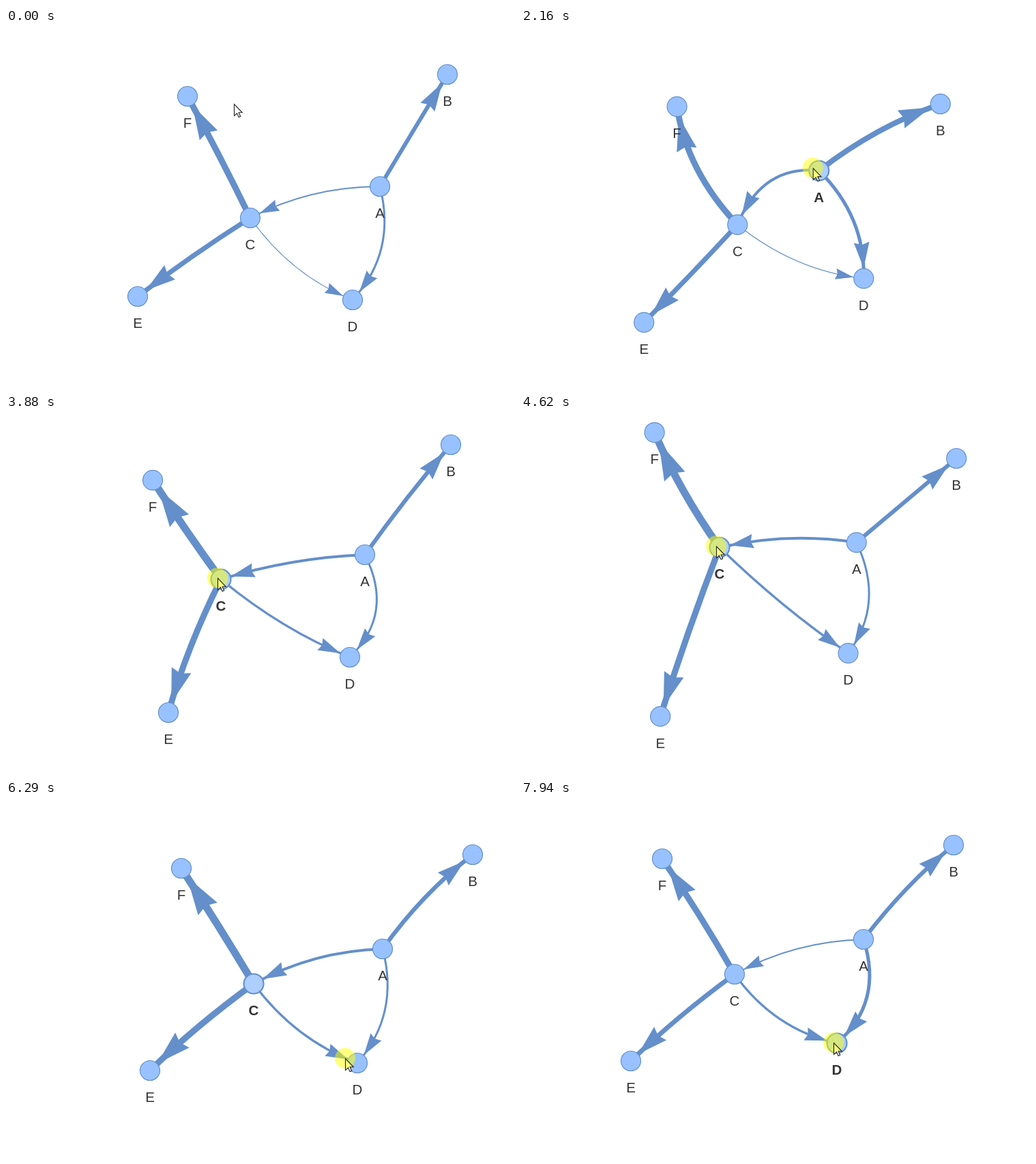
Write an HTML page with a canvas that moves like this. It is 746x524 px and loops after 8000 ms.

```html
<!DOCTYPE html>
<html lang="en">
<head>
<meta charset="utf-8">
<title>Draggable network</title>
<style>
  html, body { margin: 0; width: 100%; height: 100%; overflow: hidden; background: #fff; }
  canvas { display: block; }
</style>
</head>
<body>
<canvas id="stage" width="746" height="524"></canvas>
<script>
const LOOP = 8000;
const STEP = 1000 / 60;
const RADIUS = 15;
const EDGE_COLOR = '#648fca';
const ctx = document.getElementById('stage').getContext('2d');

// Key poses of the layout; nodes glide through them on a smooth curve.
const poseTimes = [900, 1590, 2810, 3880, 4600, 5430, 6200];
const paths = {
  A: [[548, 232], [402, 230], [504, 188], [526, 206], [492, 188], [505, 208], [552, 218]],
  B: [[647, 68], [592, 133], [650, 72], [652, 45], [638, 64], [662, 117], [684, 80]],
  C: [[358, 278], [308, 288], [334, 281], [315, 242], [291, 195], [315, 256], [363, 269]],
  D: [[508, 398], [499, 373], [507, 363], [504, 356], [480, 350], [474, 368], [515, 385]],
  E: [[193, 393], [167, 420], [204, 438], [238, 437], [205, 443], [183, 413], [211, 396]],
  F: [[266, 100], [262, 91], [195, 138], [215, 97], [196, 27], [192, 93], [257, 100]]
};

const edges = [['A', 'B', 6], ['A', 'C', 2], ['A', 'D', 3], ['C', 'D', 1.2], ['C', 'E', 7], ['C', 'F', 9]]
  .map(([from, to, width]) => ({ from, to, width }));

// Where the pointer rests: at a fixed spot, or holding a node at an offset.
const stops = [
  { arrive: 0, leave: 70, spot: [334, 111] },
  { arrive: 700, leave: 2250, node: 'A', spot: [-9, -4], press: 700 },
  { arrive: 2810, leave: 2810, spot: [319, 307] },
  { arrive: 3200, leave: 4700, node: 'C', spot: [-5, -2], press: 3200 },
  { arrive: 5430, leave: 5430, spot: [477, 346] },
  { arrive: 6200, leave: 7410, spot: [497, 378], press: 6250 },
  { arrive: 7650, leave: LOOP, node: 'D', spot: [-5, -1], press: 7720 }
];

const clamp = u => Math.max(0, Math.min(1, u));
const ease = u => u * u * (3 - 2 * u);
const progress = (t, start, end) => clamp((t - start) / (end - start));
const mix = (p, q, u) => p.map((value, k) => value + (q[k] - value) * u);

function glide(path, t) {
  const last = poseTimes.length - 1;
  if (t <= poseTimes[0]) return path[0];
  if (t >= poseTimes[last]) return path[last];
  const i = poseTimes.findIndex(time => time > t) - 1;
  const span = poseTimes[i + 1] - poseTimes[i];
  const u = (t - poseTimes[i]) / span;
  const tangent = (k, axis) => k === 0 || k === last ? 0
    : (path[k + 1][axis] - path[k - 1][axis]) / (poseTimes[k + 1] - poseTimes[k - 1]);
  return mix(path[i], path[i + 1], ease(u)).map((value, axis) => value
    + span * u * (1 - u) * ((1 - u) * tangent(i, axis) - u * tangent(i + 1, axis)));
}

function positionsAt(t) {
  const at = {};
  for (const id in paths) at[id] = glide(paths[id], t);
  const pull = ease(progress(t, 7850, 7940));
  at.D = [at.D[0] - 2 * pull, at.D[1] - 15 * pull];
  return at;
}

function panAt(t) {
  const u = ease(progress(t, 6400, 7260));
  return [-50 * u, -14 * u - 27 * Math.sin(Math.PI * u)];
}

// An edge bends through a hidden body, held to both ends by springs
// and pushed away by every node and every other hidden body.
const SPRING = 0.04, HALF_LENGTH = 70, REPULSION = 6350, GRAVITY = 0.44;
const CENTER = [425, 245];

function relax(bodies, at) {
  const nodes = Object.values(at);
  return bodies.map((body, i) => {
    const force = [0, 0];
    const push = (other, strength) => {
      const dx = body[0] - other[0], dy = body[1] - other[1];
      const distance = Math.max(10, Math.hypot(dx, dy));
      const amount = strength(distance) / distance;
      force[0] += dx * amount;
      force[1] += dy * amount;
    };
    const repel = d => REPULSION / (d * d);
    const spring = d => SPRING * (HALF_LENGTH - d);
    nodes.forEach(node => push(node, repel));
    bodies.forEach((other, k) => k !== i && push(other, repel));
    push(at[edges[i].from], spring);
    push(at[edges[i].to], spring);
    push(CENTER, () => -GRAVITY);
    return body.map((value, axis) => value + 2 * force[axis]);
  });
}

function settleBends() {
  const start = positionsAt(0);
  let bodies = edges.map(edge => mix(start[edge.from], start[edge.to], 0.5));
  for (let i = 0; i < 400; i++) bodies = relax(bodies, start);
  const history = [];
  for (let t = 0; t <= LOOP; t += STEP) {
    const at = positionsAt(t);
    for (let i = 0; i < 4; i++) bodies = relax(bodies, at);
    history.push(bodies);
  }
  return history;
}
const bends = settleBends();

function stopPoint(stop, at) {
  if (!stop.node) return stop.spot;
  return at[stop.node].map((value, k) => value + stop.spot[k]);
}

function pointerAt(t, at) {
  const i = stops.findIndex(stop => t <= stop.leave);
  const next = stops[i];
  if (t >= next.arrive) return stopPoint(next, at);
  const previous = stops[i - 1];
  return mix(stopPoint(previous, at), stopPoint(next, at), ease(progress(t, previous.leave, next.arrive)));
}

function selectedAt(t) {
  const held = stops.filter(stop => stop.node && t >= stop.press + 140).pop();
  return held ? held.node : '';
}

function curvePoint(a, c, b, u) {
  return mix(mix(a, c, u), mix(c, b, u), u);
}

function borderParameter(a, c, b) {
  let low = 0.4, high = 1;
  for (let i = 0; i < 14; i++) {
    const middle = (low + high) / 2;
    const [x, y] = curvePoint(a, c, b, middle);
    if (Math.hypot(x - b[0], y - b[1]) > RADIUS) low = middle;
    else high = middle;
  }
  return low;
}

function drawEdge(edge, control, at, selected) {
  const a = at[edge.from], b = at[edge.to];
  const active = edge.from === selected || edge.to === selected;
  const width = edge.width + (active ? 2 : 0);

  ctx.strokeStyle = ctx.fillStyle = EDGE_COLOR;
  ctx.lineWidth = width;
  ctx.beginPath();
  ctx.moveTo(...a);
  ctx.quadraticCurveTo(...control, ...b);
  ctx.stroke();

  const u = borderParameter(a, control, b);
  const tip = curvePoint(a, control, b, u);
  const guide = curvePoint(a, control, b, u - 0.1);
  const size = 23 + 3 * width;
  ctx.save();
  ctx.translate(...tip);
  ctx.rotate(Math.atan2(tip[1] - guide[1], tip[0] - guide[0]));
  ctx.scale(size, size);
  ctx.fill(new Path2D('M0 0L-1 0.3L-0.9 0L-1 -0.3Z'));
  ctx.restore();
}

function drawNode(id, [x, y], active) {
  ctx.beginPath();
  ctx.arc(x, y, 14.5, 0, 2 * Math.PI);
  ctx.fillStyle = active ? '#adcfff' : '#98c2ff';
  ctx.fill();
  ctx.strokeStyle = '#6490cb';
  ctx.lineWidth = active ? 2.2 : 1.2;
  ctx.stroke();
  ctx.fillStyle = '#343434';
  ctx.font = `${active ? 'bold ' : ''}20.5px "Liberation Sans", Arial, sans-serif`;
  ctx.fillText(id, x, y + 40.5);
}

function drawPointer([x, y], pressed) {
  const arrow = new Path2D('M0 0V17L4 13.3L6.6 19L9.2 18L6.6 12.3H11.8Z');
  ctx.save();
  ctx.translate(x + 0.5, y + 0.5);
  ctx.fillStyle = '#fff';
  ctx.fill(arrow);
  if (pressed) {
    ctx.fillStyle = 'rgba(255, 255, 0, 0.5)';
    ctx.beginPath();
    ctx.arc(-0.5, -0.5, 15, 0, 2 * Math.PI);
    ctx.fill();
  }
  ctx.strokeStyle = '#222';
  ctx.lineWidth = 1.1;
  ctx.stroke(arrow);
  ctx.restore();
}

function draw(t) {
  const at = positionsAt(t);
  const selected = selectedAt(t);
  const controls = bends[Math.floor(t / STEP)];
  ctx.fillStyle = '#fff';
  ctx.fillRect(0, 0, 746, 524);
  ctx.textAlign = 'center';
  ctx.textBaseline = 'middle';
  ctx.save();
  ctx.translate(...panAt(t));
  edges.forEach((edge, i) => drawEdge(edge, controls[i], at, selected));
  for (const id in at) drawNode(id, at[id], id === selected);
  drawPointer(pointerAt(t, at), stops.some(stop => t >= stop.press && t < stop.leave));
  ctx.restore();
}

const begin = performance.now();
function tick() {
  draw((performance.now() - begin) % LOOP);
  requestAnimationFrame(tick);
}
tick();
</script>
</body>
</html>
```
